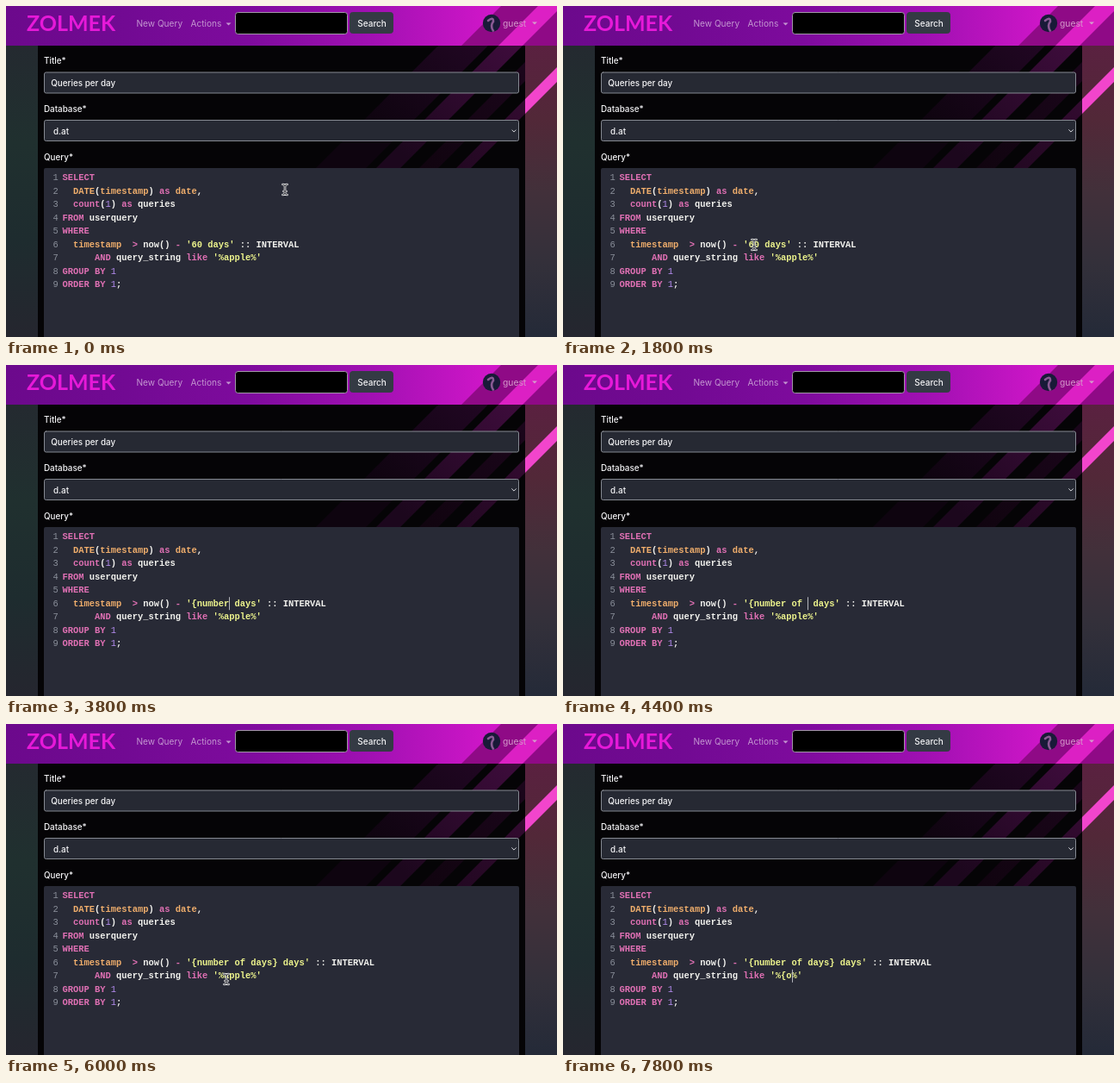
An HTML page with a canvas for the animation above (8000 ms loop, 640 px wide and 384 px high).

```html
<!DOCTYPE html>
<html lang="en">
<head>
<meta charset="utf-8">
<title>Query editor</title>
<style>
html, body { margin: 0; width: 100%; height: 100%; overflow: hidden; background: #050406; }
canvas { display: block; width: 640px; height: 384px; }
</style>
</head>
<body>
<canvas id="stage" width="640" height="384"></canvas>
<script>
const ctx = document.getElementById('stage').getContext('2d');
const W = 640, H = 384, LOOP = 8000, STEP = 200;
const UI = 'Inter, "Open Sans", sans-serif';
const MONO = '"Liberation Mono", monospace';
const CODE = { x: 65.6, y: 202, col: 6.25, row: 15.55, size: 10.42 };
const INK = {
  k: '#e070b4', // keyword
  b: '#f0ae6c', // builtin
  n: '#b58df0', // number
  s: '#eef58d', // string
  w: '#f2f2ee'  // plain
};

function box(x, y, w, h, r, fill, line) {
  ctx.beginPath();
  ctx.roundRect(x, y, w, h, r);
  ctx.fillStyle = fill;
  ctx.fill();
  if (line) {
    ctx.strokeStyle = line;
    ctx.lineWidth = 1;
    ctx.stroke();
  }
}

function text(str, x, y, color, font) {
  ctx.font = font;
  ctx.fillStyle = color;
  ctx.fillText(str, x, y);
}

function poly(color, ...pts) {
  ctx.beginPath();
  for (let i = 0; i < pts.length; i += 2) ctx.lineTo(pts[i], pts[i + 1]);
  ctx.closePath();
  ctx.fillStyle = color;
  ctx.fill();
}

function gradient(x0, y0, x1, y1, ...colors) {
  const g = ctx.createLinearGradient(x0, y0, x1, y1);
  colors.forEach((c, i) => g.addColorStop(i / (colors.length - 1), c));
  return g;
}

// Diagonal band between the lines x + y = a and x + y = b
function band(a, b, top, bottom, color) {
  poly(color, a - top, top, b - top, top, b - bottom, bottom, a - bottom, bottom);
}

function clipped(x, y, w, h, draw) {
  ctx.save();
  ctx.beginPath();
  ctx.rect(x, y, w, h);
  ctx.clip();
  draw();
  ctx.restore();
}

function backdrop() {
  ctx.fillStyle = gradient(0, 46, 0, H, '#242a30', '#20302f', '#1e2c2f', '#25262f');
  ctx.fillRect(0, 46, 38, H);
  ctx.fillStyle = gradient(0, 46, 0, H, '#5a2140', '#522838', '#42303a', '#33303a', '#242a38');
  ctx.fillRect(602, 46, 38, H);
  clipped(603, 46, 37, H, () => band(711, 728, 0, H, '#f245cc'));
  ctx.fillStyle = '#050406';
  ctx.fillRect(37, 46, 566, H);
  clipped(37, 46, 566, 142, () => {
    const fade = (near, far) => gradient(600, 46, 480, 188, near, far);
    band(548, 606, 46, 188, fade('#240726', '#0e040f'));
    band(618, 646, 46, 188, fade('#3e0c3c', '#1c071d'));
    band(668, 690, 46, 188, fade('#1c061c', '#10040f'));
    band(711, 728, 46, 188, fade('#3a0c36', '#1e071e'));
  });
}

function navbar() {
  ctx.fillStyle = gradient(0, 0, 560, 0, '#6c098c', '#720a93', '#7e0b9d', '#a010b2', '#cf16c8');
  ctx.fillRect(0, 0, W, 46);
  clipped(0, 0, W, 46, () => {
    band(575, 700, 0, 46, '#8f0a86');
    band(618, 646, 0, 46, '#dc20c4');
  });
  text('ZOLMEK', 24, 29, '#e619d8', 'bold 25px Lato, sans-serif');
  const link = '#c396d0';
  text('New Query', 151.5, 24.3, link, '10.1px ' + UI);
  text('Actions', 214.5, 24.3, link, '10.1px ' + UI);
  poly(link, 255.5, 19.5, 261.5, 19.5, 258.5, 22.5);
  box(266.5, 7.5, 130, 25, 3, '#000', '#a196a6');
  box(399.5, 7.5, 50, 24, 3, '#343a44', '#343a44');
  text('Search', 408.3, 24, '#f4f4f6', '500 10px ' + UI);
  avatar(564, 20);
  text('guest', 577, 24, '#d59acb', '10.3px ' + UI);
  poly('#d59acb', 611, 18.5, 617, 18.5, 614, 21.5);
}

function avatar(x, y) {
  ctx.save();
  ctx.beginPath();
  ctx.arc(x, y, 10.2, 0, 7);
  ctx.clip();
  ctx.fillStyle = '#191a38';
  ctx.fillRect(x - 11, y - 11, 22, 22);
  ctx.lineCap = 'round';
  ctx.strokeStyle = '#8a5a94';
  ctx.lineWidth = 2.6;
  ctx.beginPath();
  ctx.moveTo(x - 4, y - 3);
  ctx.quadraticCurveTo(x + 2, y - 8, x + 2, y - 2);
  ctx.quadraticCurveTo(x - 2, y + 3, x + 2, y + 9);
  ctx.stroke();
  ctx.restore();
}

function form() {
  const font = '500 9.85px ' + UI, color = '#f6f6f8';
  text('Title*', 44, 67, color, font);
  text('Database*', 44, 123, color, font);
  text('Query*', 44, 179, color, font);
  for (const y of [77, 132.5]) box(44.5, y, 551, 24, 2, '#262933', '#858991');
  text('Queries per day', 52.3, 93, color, font);
  text('d.at', 55, 149, color, font);
  ctx.strokeStyle = '#d5d7dc';
  ctx.lineWidth = 1;
  ctx.beginPath();
  ctx.moveTo(587.6, 143.7);
  ctx.lineTo(590, 146.1);
  ctx.lineTo(592.4, 143.7);
  ctx.stroke();
  box(44, 188, 552, 200, [2, 2, 0, 0], '#282a36');
}

// Each line is "color:text" pieces joined by "|"
function codeLines(days, word) {
  return [
    'k:SELECT',
    'w:  |b:DATE|w:(|b:timestamp|w:) |k:as|w: |b:date|w:,',
    'w:  |k:count|w:(|n:1|w:) |k:as|w: queries',
    'k:FROM|w: userquery',
    'k:WHERE',
    `w:  |b:timestamp|w:  |k:>|w: now() |k:-|w: |s:'${days} days'|w: :: INTERVAL`,
    `w:      |k:AND|w: query_string |k:like|w: |s:'%${word}%'`,
    'k:GROUP BY|w: |n:1',
    'k:ORDER BY|w: |n:1|w:;'
  ];
}

const colX = col => CODE.x + col * CODE.col;
const rowY = row => CODE.y + row * CODE.row;

function select(row, col, len) {
  ctx.fillStyle = '#4b4d55';
  ctx.fillRect(colX(col), rowY(row) - 10.5, len * CODE.col, 15);
}

function caret(row, col) {
  ctx.fillStyle = '#b4b5bc';
  ctx.fillRect(Math.round(colX(col)), rowY(row) - 10.5, 1, 15);
}

function drawCode(days, word) {
  const thin = `${CODE.size}px ${MONO}`, bold = 'bold ' + thin;
  codeLines(days, word).forEach((line, row) => {
    const y = rowY(row);
    text(row + 1, 54.6, y, '#8b909b', thin);
    let col = 0;
    for (const piece of line.split('|')) {
      const kind = piece[0], str = piece.slice(2);
      text(str, colX(col), y, INK[kind], kind === 'n' ? thin : bold);
      col += str.length;
    }
  });
}

function pointer(x, y) {
  const shape = () => {
    ctx.beginPath();
    ctx.moveTo(x - 2.5, y - 6);
    ctx.quadraticCurveTo(x, y - 6, x, y - 4);
    ctx.quadraticCurveTo(x, y - 6, x + 2.5, y - 6);
    ctx.moveTo(x, y - 4);
    ctx.lineTo(x, y + 4);
    ctx.moveTo(x - 2.5, y + 6);
    ctx.quadraticCurveTo(x, y + 6, x, y + 4);
    ctx.quadraticCurveTo(x, y + 6, x + 2.5, y + 6);
    ctx.moveTo(x - 1.5, y + 2);
    ctx.lineTo(x + 1.5, y + 2);
    ctx.stroke();
  };
  ctx.lineCap = 'round';
  ctx.strokeStyle = '#e6e6e8';
  ctx.lineWidth = 2.6;
  shape();
  ctx.strokeStyle = '#24252c';
  ctx.lineWidth = 0.9;
  shape();
}

const PATH = [
  [0, 324, 213], [400, 324, 213], [1600, 222, 277], [5400, 222, 277],
  [6000, 256, 296], [6400, 268, 295], [LOOP, 268, 295]
];

function pointerAt(t) {
  const i = PATH.findIndex(p => p[0] > t);
  const [t0, x0, y0] = PATH[i - 1], [t1, x1, y1] = PATH[i];
  const u = (t - t0) / (t1 - t0), e = u * u * (3 - 2 * u);
  return [x0 + (x1 - x0) * e, y0 + (y1 - y0) * e];
}

const PHRASE = '{number of days}';
const typed = t => PHRASE.slice(0, Math.max(1, Math.round(2 + (t - 3000) * 9 / 1400)));

function render(t) {
  const days = t < 2800 ? '60' : typed(t);
  const word = t < 7600 ? 'apple' : '{o'.slice(0, t < 7800 ? 1 : 2);
  backdrop();
  navbar();
  form();
  if (t >= 2200 && t < 2800) select(5, 24, 2);
  if (t >= 6400 && t < 7600) select(6, 30, 5);
  drawCode(days, word);
  const blinkOn = t < 5200 || (t - 5200) % 1060 < 530;
  if (t >= 2800 && t < 6200 && blinkOn) caret(5, 24 + days.length);
  if (t >= 7600) caret(6, 30 + word.length);
  const typing = (t >= 2800 && t < 5400) || t >= 7600;
  if (!typing) pointer(...pointerAt(t));
}

let last = -1;
function tick() {
  const step = Math.floor(performance.now() % LOOP / STEP);
  if (step !== last) render((last = step) * STEP);
  requestAnimationFrame(tick);
}
tick();
</script>
</body>
</html>
```
